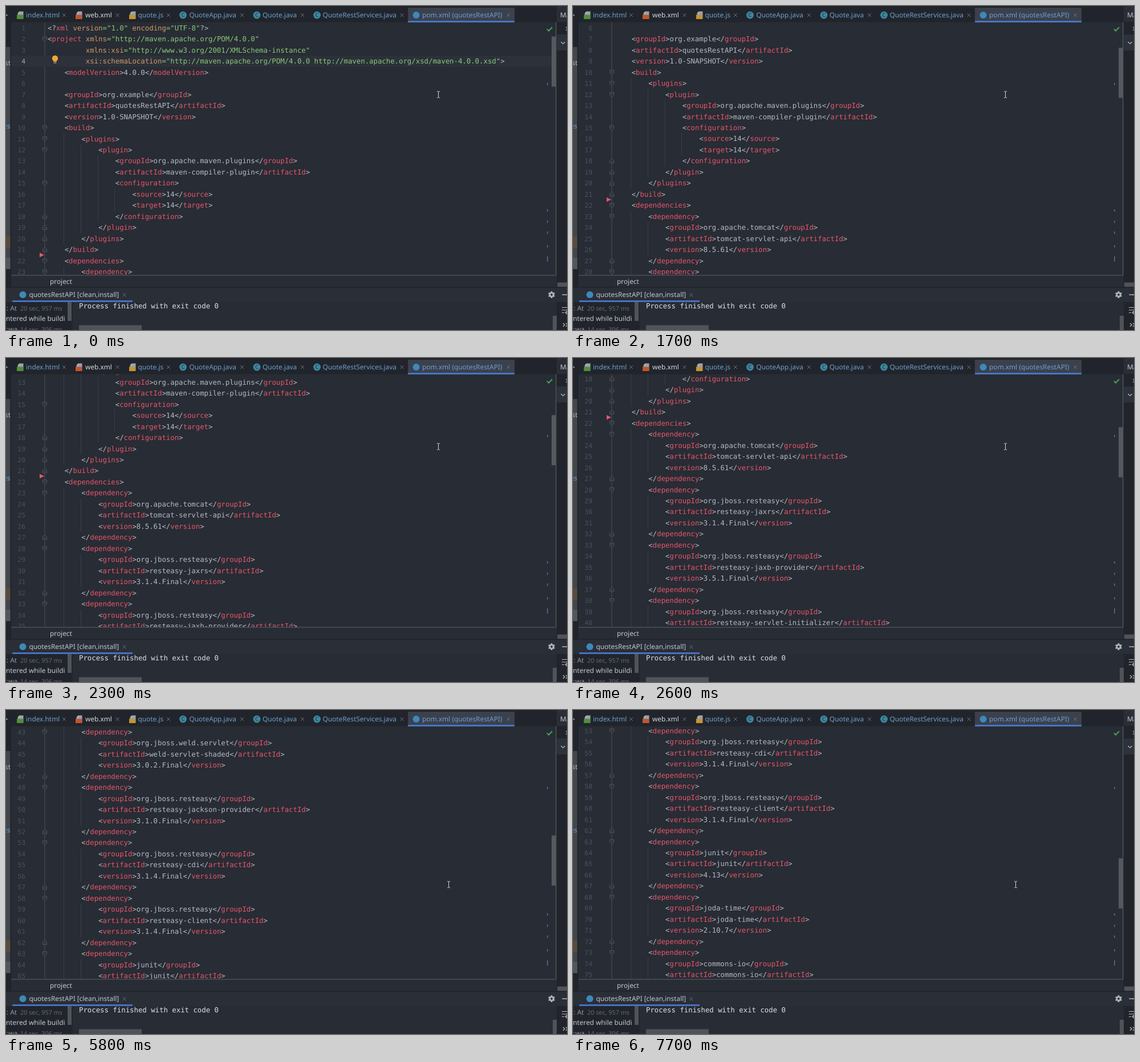
An HTML page that plays this animation: 984 px wide and 569 px high, repeating every 8 s.

```html
<!DOCTYPE html>
<html lang="en">
<head>
<meta charset="utf-8">
<title>pom.xml</title>
<style>
  html, body { margin: 0; width: 100%; height: 100%; overflow: hidden; background: #21252b; }
  svg { display: block; width: 984px; height: 569px; }
  text { font: 11.85px "Noto Sans", "Open Sans", sans-serif; fill: #c3c8d1; text-rendering: geometricPrecision; }
  .code { font: 12.33px "DejaVu Sans Mono", "Noto Sans Mono", monospace; fill: #b4bac5; }
  .num { font-size: 11.4px; fill: #495162; text-anchor: end; }
  .small { font-size: 10.8px; }
  .badge { font-size: 9.5px; text-anchor: middle; }
  .tag { fill: #e5566c; }
  .attr { fill: #d19a66; }
  .str { fill: #89ca78; }
  .line { fill: none; stroke-width: 1.2; }
  .thin { stroke-width: 1; }
</style>
</head>
<body>
<svg id="stage" viewBox="0 0 984 569" xmlns="http://www.w3.org/2000/svg"></svg>
<script>
const LINE = 19.47, TOP = 38.6, LEFT = 73, CHAR = 7.42;
const EDITOR = '#282c34', PANEL = '#21252b', HEADER = '#2a2e37', BLUE = '#6c9fd2';
const DIM = '#626974', THUMB = '#505359', ACCENT = '#4876cc';

// drawing helpers
const rect = (x, y, w, h, fill, more = '') =>
  `<rect x="${x}" y="${y}" width="${w}" height="${h}" fill="${fill}" ${more}/>`;
const path = (d, stroke, cls = '', more = '') => `<path class="line ${cls}" d="${d}" stroke="${stroke}" ${more}/>`;
const label = (x, y, s, fill = '#c3c8d1', more = '') =>
  `<text x="${x}" y="${y}" style="fill:${fill}" ${more}>${s}</text>`;
const esc = s => s.replace(/&/g, '&amp;').replace(/</g, '&lt;').replace(/>/g, '&gt;');
const span = (cls, s) => `<tspan class="${cls}">${esc(s)}</tspan>`;
const lineY = n => TOP + (n - 1) * LINE;

// document lines: [indent, text]
const doc = [];
const add = (indent, ...rows) => rows.forEach(s => doc.push([indent, s]));
const el = (name, value) => `<${name}>${value}</${name}>`;
add(0, '<?xml version="1.0" encoding="UTF-8"?>', '<project xmlns="http://maven.apache.org/POM/4.0.0"');
add(9, 'xmlns:xsi="http://www.w3.org/2001/XMLSchema-instance"',
  'xsi:schemaLocation="http://maven.apache.org/POM/4.0.0 http://maven.apache.org/xsd/maven-4.0.0.xsd">');
add(4, el('modelVersion', '4.0.0'), '', el('groupId', 'org.example'),
  el('artifactId', 'quotesRestAPI'), el('version', '1.0-SNAPSHOT'), '<build>');
add(8, '<plugins>');
add(12, '<plugin>');
add(16, el('groupId', 'org.apache.maven.plugins'), el('artifactId', 'maven-compiler-plugin'), '<configuration>');
add(20, el('source', 14), el('target', 14));
add(16, '</configuration>');
add(12, '</plugin>');
add(8, '</plugins>');
add(4, '</build>', '<dependencies>');
const jboss = 'org.jboss.resteasy';
[
  ['org.apache.tomcat', 'tomcat-servlet-api', '8.5.61'],
  [jboss, 'resteasy-jaxrs', '3.1.4.Final'],
  [jboss, 'resteasy-jaxb-provider', '3.5.1.Final'],
  [jboss, 'resteasy-servlet-initializer', '3.1.4.Final'],
  ['org.jboss.weld.servlet', 'weld-servlet-shaded', '3.0.2.Final'],
  [jboss, 'resteasy-jackson-provider', '3.1.0.Final'],
  [jboss, 'resteasy-cdi', '3.1.4.Final'],
  [jboss, 'resteasy-client', '3.1.4.Final'],
  ['junit', 'junit', '4.13'],
  ['joda-time', 'joda-time', '2.10.7'],
  ['commons-io', 'commons-io', '2.8.0']
].forEach(([group, artifact, version]) => {
  add(8, '<dependency>');
  add(12, el('groupId', group), el('artifactId', artifact), el('version', version));
  add(8, '</dependency>');
});

function highlight(s) {
  const token = /(<[\/?]?)([\w]+)|(="[^"]*")|([\w:]+)(?==")|([^<="]+?(?=<|$|\s|[\w:]+="))|(.)/g;
  return s.replace(token, (m, open, tag, str, attr) =>
    tag ? esc(open) + span('tag', tag) : str ? span('str', str) : attr ? span('attr', attr) : esc(m));
}

function foldMark(y, open) {
  const k = open ? 1 : -1;
  return path(`M64.5 ${y - 3.5 * k}h7v${4.5 * k}l-3.5 ${3 * k}l-3.5 ${-3 * k}z`, '#535963', 'thin', `style="fill:${EDITOR}"`) +
    path(`M66.5 ${y - .5 * k}h3`, '#5d636d', 'thin');
}

function guide(col, from, to) {
  const x = Math.floor(LEFT + col * CHAR) - .5;
  return path(`M${x} ${lineY(from) - LINE / 2}V${lineY(to) + LINE / 2}`, '#3a3f48', 'thin');
}

function documentView() {
  let out = rect(9, lineY(4) - LINE / 2, 948, LINE, '#2c313a');
  out += guide(4, 11, 20) + guide(8, 12, 19) + guide(12, 13, 18) + guide(16, 16, 17) + guide(4, 23, doc.length);
  doc.forEach(([indent, s], i) => {
    const n = i + 1, y = lineY(n);
    out += `<text class="code num" x="34" y="${y + 4.2}"${n === 4 ? ' style="fill:#a4abb7"' : ''}>${n}</text>`;
    out += `<text class="code" x="${LEFT + indent * CHAR}" y="${y + 4.2}">${highlight(s)}</text>`;
    const closing = s.startsWith('</');
    if (n === 2 || closing || /^<\w+>$/.test(s)) out += foldMark(y, !closing);
    if (s === '<dependency>') out += guide(8, n + 1, n + 3);
  });
  out += `<path d="M59 ${lineY(21.5) - 4.5}l8 4l-8 4z" fill="#e5566c"/>`;
  const b = lineY(4) - 4;
  out += `<circle cx="86" cy="${b - 1}" r="5.2" fill="#f0a732"/>` + rect(83.5, b + 3, 5, 2, '#f0a732') +
    rect(83.5, b + 6, 5, 1.4, '#a9adb5');
  return out;
}

const cross = (x, y) => path(`M${x - 3} ${y - 3}l6 6m0-6l-6 6`, '#69707c', 'thin');
const fileIcon = (x, color) =>
  `<path d="M${x - 2} 9.5h6.5v13h-10v-9z" fill="#9aa4ae"/><path d="M${x - 5.5} 12.5l3-3v3z" fill="#c0c8cf"/>` +
  rect(x - 7, 15.5, 11, 7.5, color);
const classIcon = x => `<circle cx="${x}" cy="16" r="6.4" fill="#3c87a3"/>` +
  label(x, 19.4, 'C', '#1f2d36', 'class="badge"');

function tabs() {
  let out = rect(705, 3, 187, 26, '#3b414c') + rect(705, 26, 187, 2.8, ACCENT);
  out += fileIcon(26, '#4f8f3a') + fileIcon(129, '#c4552c') + fileIcon(223, '#c8952f');
  out += [310.5, 440, 545.5].map(classIcon).join('');
  out += '<circle cx="719.5" cy="16" r="6" fill="#3d88bd"/>';
  [[35, 'index.html', 102], [139, 'web.xml', 195.5], [231.5, 'quote.js', 285], [321.5, 'QuoteApp.java', 414],
   [450, 'Quote.java', 520], [555.5, 'QuoteRestServices.java', 694.5], [730, 'pom.xml (quotesRestAPI)', 881]]
    .forEach(([x, s, end], i) => { out += label(x, 20.3, s, i === 1 ? '#d3d7de' : BLUE) + cross(end, 16); });
  return out;
}

function sides() {
  return rect(0, 28, 8, 466, PANEL) + rect(0, 72, 7.5, 390, '#43464b') + rect(0, 405, 7.5, 19, '#5a4c3c') +
    rect(0, 442, 7.5, 20, '#52565d') + rect(0, 15.3, 3, 1.4, '#aab0ba') + rect(8, 0, 1, 494, '#1c1f25') +
    label(-2, 103.5, 'st', '#b3b8c0', 'clip-path="url(#strip)"') +
    label(-5, 215, 'es', BLUE, 'clip-path="url(#strip)"') +
    rect(966, 0, 18, 494, PANEL) + rect(966, 0, 18, 28, HEADER) + rect(966, 50, 18, 28, '#2d323b') +
    label(972, 20.3, 'Maven') +
    path('M982 37l3 3l-3 3', '#9da3ad') + path('M973.5 63l3.5 3.5l3.5-3.5', '#b4bac3') +
    rect(967, 485.5, 17, 8, THUMB);
}

function gear(x, y) {
  let teeth = '';
  for (let a = 0; a < 360; a += 60) teeth += rect(x - 1.4, y - 6, 2.8, 4, '#aeb4bd', `transform="rotate(${a} ${x} ${y})"`);
  return teeth + `<circle cx="${x}" cy="${y}" r="3.2" fill="none" stroke="#aeb4bd" stroke-width="2.6"/>`;
}

function bottom() {
  return rect(9, 473, 957, 21, EDITOR) + rect(9, 472.5, 956, 1, '#5b5f67') + label(77, 488.4, 'project') +
    rect(0, 494, 984, 75, PANEL) + rect(0, 494, 984, 26, HEADER) + rect(0, 493.5, 984, 1, '#1a1d22') +
    rect(11, 517, 211, 2.8, ACCENT) +
    '<circle cx="29.5" cy="507" r="6" fill="#3d88bd"/>' +
    label(40.5, 511.3, 'quotesRestAPI [clean,install]') + cross(207.5, 507.5) +
    gear(957, 507) + rect(975.5, 506.3, 9, 1.5, '#b4bac3') +
    rect(117, 520, 849, 49, EDITOR) + rect(108, 520, 7, 33, THUMB) +
    '<g clip-path="url(#tree)">' + label(1, 534.6, ': At', '#9299a4') +
    label(25, 534.6, '20 sec, 957 ms', DIM, 'class="small"') + label(0, 553.2, 'ntered while building') +
    label(1, 572, ':wa', '#9299a4') + label(25, 572, '14 sec, 306 ms', DIM, 'class="small"') + '</g>' +
    '<text class="code" x="128" y="531.3" style="fill:#dfe2e7">Process finished with exit code 0</text>' +
    rect(128, 560.5, 110, 9, THUMB) + rect(959, 544, 7, 25, THUMB) +
    path('M975 529.5h10M975 534h10M975 538.5h4M981 538.5l3-2.5v5z', '#b4bac3') +
    path('M977 557l3 3l-3 3m5-6l3 3l-3 3', '#b4bac3');
}

const marks = [[137, 4], [359, 4], [379, 4], [398, 4], [422, 4], [444, 9]]
  .map(([y, h]) => rect(949, y - h / 2, 1.6, h, '#636a76')).join('');
const clip = (id, x, y, w, h) => `<clipPath id="${id}">${rect(x, y, w, h, '#000')}</clipPath>`;

const stage = document.getElementById('stage');
stage.innerHTML = '<defs>' + clip('view', 9, 28.5, 956, 444) + clip('strip', 0, 28, 8, 466) +
  clip('tree', 0, 520, 104, 49) + '</defs>' + rect(0, 0, 984, 569, PANEL) + rect(9, 28.5, 957, 445, EDITOR) +
  '<g clip-path="url(#view)">' + path('M68 28V473', '#4a4f58', 'thin') +
  `<g id="doc">${documentView()}</g></g>` + rect(964, 28.5, 1.2, 444, '#555a62') + marks +
  path('M949 40.5l3 3.2l6-6.5', '#499c54', '', 'style="stroke-width:2.2"') +
  rect(957, 53.5, 8, 88, '#55585e', 'id="thumb"') + tabs() + sides() + bottom() +
  `<g id="cursor">${path('M-2.5-5.5h1.8l.7 .7l.7-.7h1.8M0-5V5M-2.5 5.5h1.8l.7-.7l.7 .7h1.8', '#d5d8dc', 'thin')}</g>`;

const [view, thumb, cursor] = ['doc', 'thumb', 'cursor'].map(id => document.getElementById(id));

// wheel jumps after the first scroll: [time, lines]
const jumps = [[2300, 11.8], [2400, 13.7], [2500, 15.6], [2600, 17.1], [4800, 26.5], [5000, 31.6],
  [5400, 36.9], [5800, 42], [7400, 47.1], [7700, 52.1]];

function scrollAt(t) {
  if (t < 1400) return 0;
  if (t < 2300) return 2 + Math.floor((t - 1400) / 100);
  return jumps.filter(j => j[0] <= t).pop()[1];
}

function render(t) {
  const y = scrollAt(t) * LINE;
  view.setAttribute('transform', `translate(0 ${-y})`);
  thumb.setAttribute('y', 53.5 + y * .204);
  cursor.setAttribute('transform', t < 4800 ? 'translate(758.5 155.5)' : 'translate(776.5 306.5)');
}

const start = performance.now();
function tick() {
  render((performance.now() - start) % 8000);
  requestAnimationFrame(tick);
}
render(0);
tick();
</script>
</body>
</html>
```
